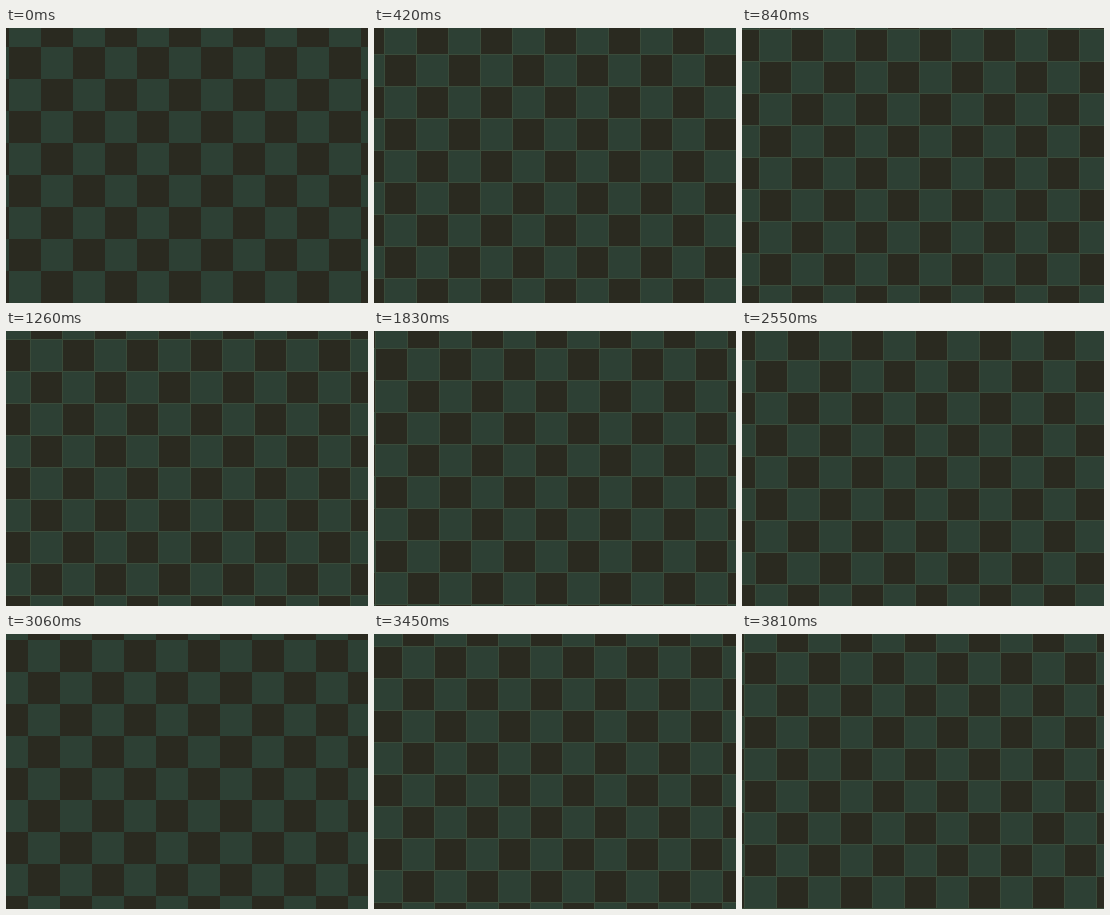
An HTML page with a canvas for the animation above (3.84 s loop, 362 by 275 pixels).

```html
<!DOCTYPE html>
<html lang="en">
<head>
<meta charset="utf-8">
<title>Drifting checkerboard</title>
<style>
  html, body { margin: 0; width: 100%; height: 100%; overflow: hidden; background: #2a2a20; }
  canvas { display: block; }
</style>
</head>
<body>
<canvas id="stage" width="362" height="275"></canvas>
<script>
const canvas = document.getElementById("stage");
const ctx = canvas.getContext("2d");
const WIDTH = 362, HEIGHT = 275, TILE = 32;
const LOOP_MS = 3840, STEP_MS = 30;
const DARK = "#2a2a20", GREEN = "#2d4034", SEAM = "#3a4b3a";

// The drift runs half a pixel ahead between a skipped and a held step.
function driftAt(time) {
  const step = Math.floor((time % LOOP_MS) / STEP_MS);
  const ahead = step >= 7 && step < 48 ? 1 : 0;
  return (step + ahead) / 2;
}

function draw(time) {
  const drift = driftAt(time);
  const whole = Math.floor(drift);
  const left = 3 + whole - 3 * TILE;
  const top = 19 + whole - 3 * TILE;

  ctx.fillStyle = DARK;
  ctx.fillRect(0, 0, WIDTH, HEIGHT);

  ctx.fillStyle = GREEN;
  for (let row = 0; top + row * TILE < HEIGHT; row++) {
    for (let col = (row + 1) % 2; left + col * TILE < WIDTH; col += 2) {
      ctx.fillRect(left + col * TILE, top + row * TILE, TILE, TILE);
    }
  }

  // Tiles lying between pixels leave a faint seam.
  if (drift !== whole) {
    ctx.fillStyle = SEAM;
    for (let x = left; x < WIDTH; x += TILE) ctx.fillRect(x, 0, 1, HEIGHT);
    for (let y = top; y < HEIGHT; y += TILE) ctx.fillRect(0, y, WIDTH, 1);
  }
}

let start;
function tick(now) {
  start ??= now;
  draw(now - start);
  requestAnimationFrame(tick);
}
draw(0);
requestAnimationFrame(tick);
</script>
</body>
</html>
```
